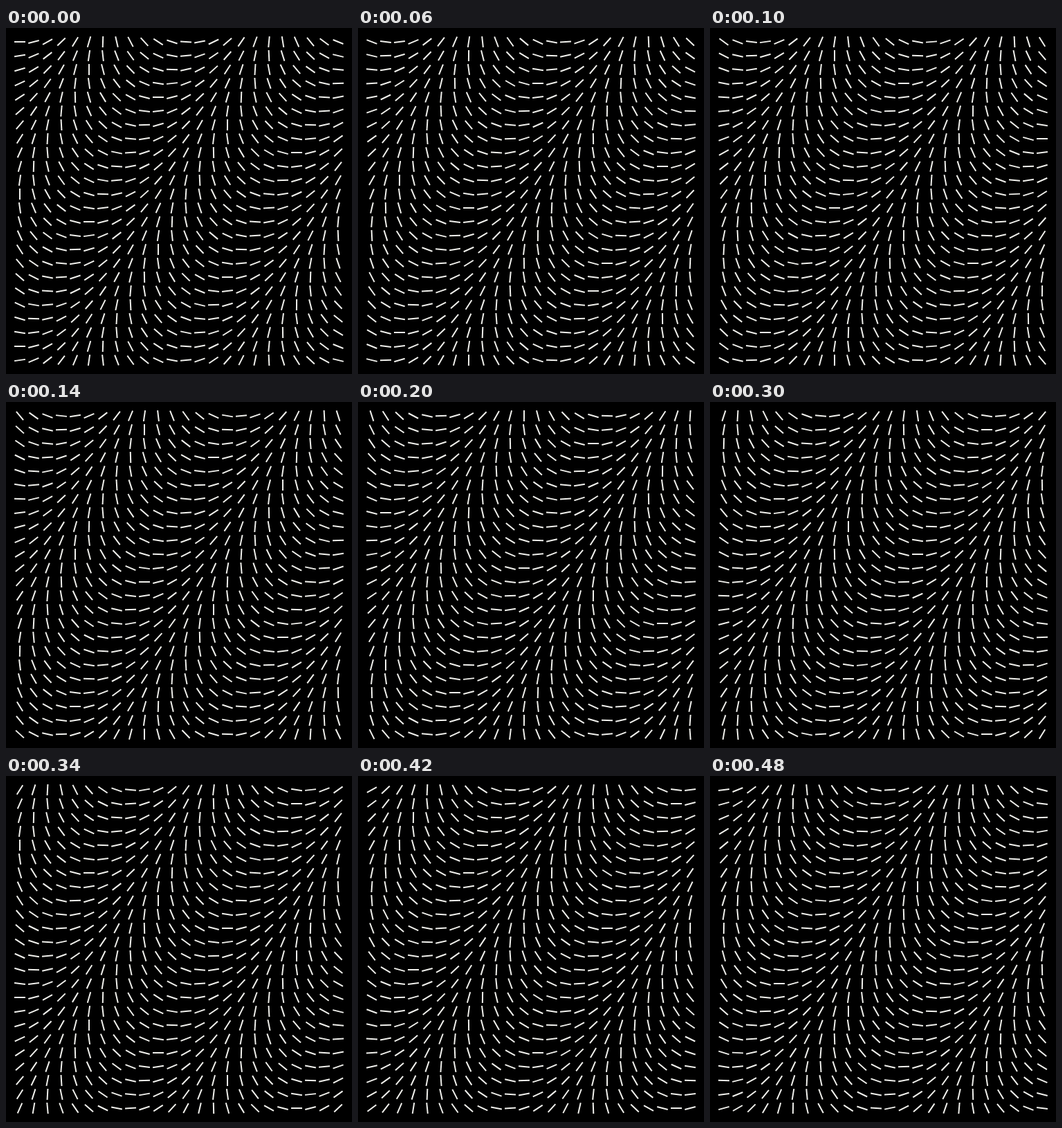
These frames come from a looping animation (500 by 500 pixels, 0.5 s). An HTML page with a canvas:

```html
<!DOCTYPE html>
<html lang="en">
<head>
<meta charset="utf-8">
<title>Rotating dashes</title>
<style>
  html, body { margin: 0; width: 100%; height: 100%; overflow: hidden; background: #000; }
  canvas { display: block; width: 500px; height: 500px; }
</style>
</head>
<body>
<canvas id="stage" width="500" height="500"></canvas>
<script>
  const ctx = document.getElementById('stage').getContext('2d');
  const COUNT = 24, GAP = 20, HALF = 8;
  const STEPS = 25, STEP_MS = 20;
  const rad = deg => deg * Math.PI / 180;
  const COL_TURN = rad(14.7), ROW_TURN = rad(8.18), STEP_TURN = rad(180 / STEPS);

  function draw(step) {
    ctx.fillStyle = '#000';
    ctx.fillRect(0, 0, 500, 500);
    ctx.strokeStyle = '#f0f0ec';
    ctx.lineWidth = 2;
    ctx.beginPath();
    for (let row = 0; row < COUNT; row++) {
      for (let col = 0; col < COUNT; col++) {
        const angle = step * STEP_TURN - col * COL_TURN - row * ROW_TURN;
        const x = GAP * (col + 1), y = GAP * (row + 1);
        const dx = HALF * Math.cos(angle), dy = HALF * Math.sin(angle);
        ctx.moveTo(x - dx, y - dy);
        ctx.lineTo(x + dx, y + dy);
      }
    }
    ctx.stroke();
  }

  const start = performance.now();
  function tick() {
    const elapsed = Math.max(0, performance.now() - start);
    draw(Math.floor(elapsed / STEP_MS) % STEPS);
    requestAnimationFrame(tick);
  }
  tick();
</script>
</body>
</html>
```
